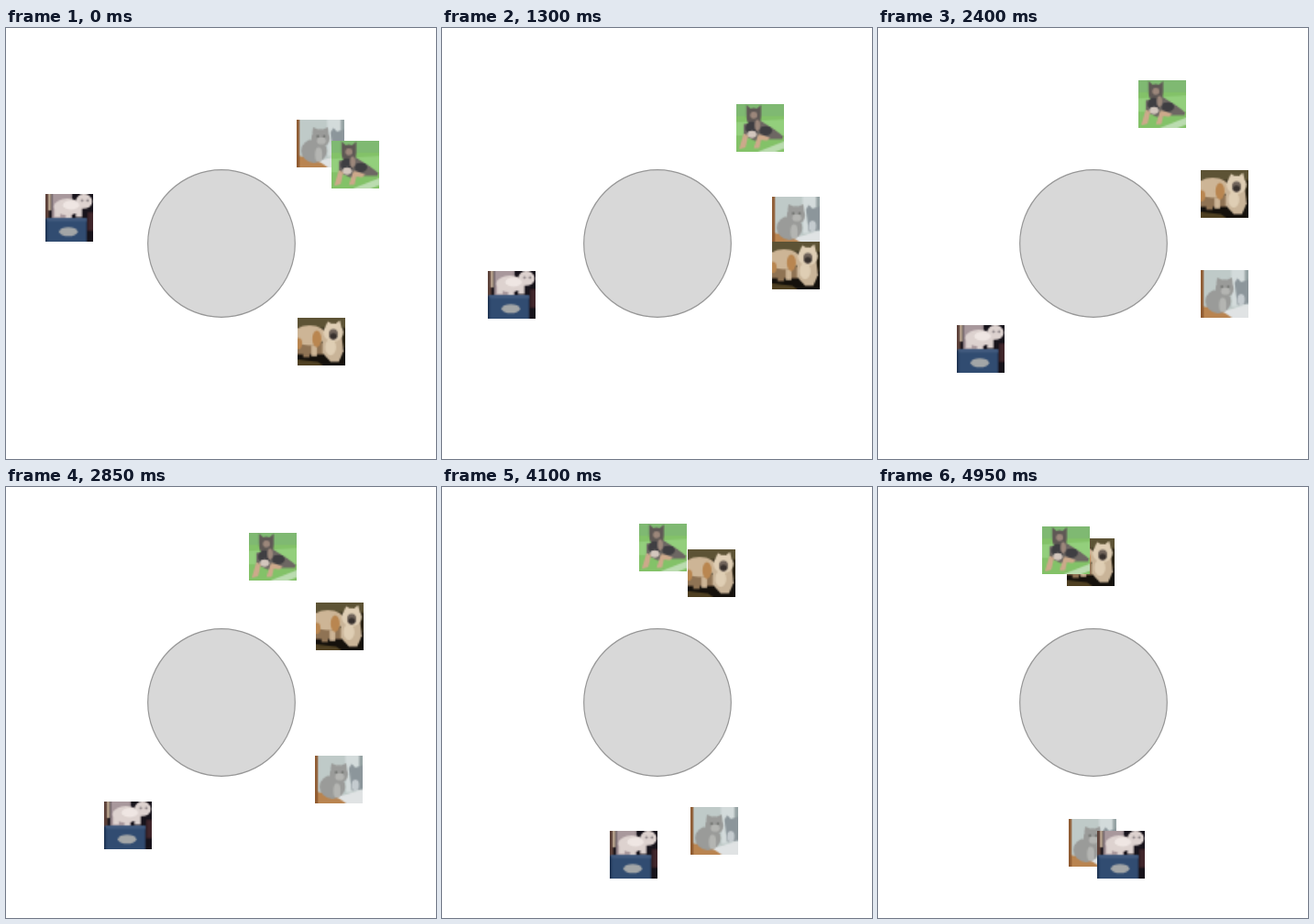
Recreate the animation shown at these times as an HTML page with a canvas. Size 469x470 px, loop 8000 ms.

```html
<!DOCTYPE html>
<html lang="en">
<head>
<meta charset="utf-8">
<style>
  html, body { margin: 0; height: 100%; overflow: hidden; background: #fff; }
  canvas { display: block; }
</style>
</head>
<body>
<canvas id="stage" width="469" height="470"></canvas>
<script>
const ctx = document.getElementById('stage').getContext('2d');
const LOOP = 8000, STEP = 50, SIZE = 52, CENTER = 235;
const times = [0, 750, 1700, 1900, 2850, 3600, 4100, 4950];

// A small soft picture: [colour, path] layers on a 52-unit square, kept at 32 px.
function thumbnail(background, layers) {
  const tile = document.createElement('canvas');
  tile.width = tile.height = 32;
  const c = tile.getContext('2d');
  c.fillStyle = background;
  c.fillRect(0, 0, 32, 32);
  c.scale(32 / SIZE, 32 / SIZE);
  c.filter = 'blur(0.6px)';
  for (const [color, path] of layers) {
    c.fillStyle = color;
    c.fill(new Path2D(path));
  }
  return tile;
}

const oval = (x, y, rx, ry = rx) =>
  `M${x - rx} ${y}a${rx} ${ry} 0 1 1 ${2 * rx} 0a${rx} ${ry} 0 1 1 ${-2 * rx} 0z`;
const box = (x, y, w, h) => `M${x} ${y}h${w}v${h}h${-w}z`;

const greyCat = thumbnail('#bfcac8', [
  ['#d3dbdb', 'M33 -4H48L56 40H34z'],
  ['#97a4a5', box(48, -4, 8, 16)],
  ['#b98450', 'M-4 38L14 42L36 50V56H-4z'],
  ['#e0e3e4', 'M24 45L56 36V56H40z'],
  ['#8f5a30', box(-4, -4, 7, 60)],
  ['#8c969b', 'M37 14L40 9L44 13L56 9V36L40 38z'],
  ['#c4cbcf', oval(44, 32, 4, 6)],
  ['#9a9b99', oval(19, 34, 14, 13) + oval(26, 20, 10) + 'M17 15L18 8L24 11zM28 11L34 8L35 16z'],
  ['#b4b5b2', oval(27, 23, 5, 4) + oval(24, 38, 4, 8)],
  ['#70726f', oval(23, 18, 1.5) + oval(30, 18, 1.5)],
]);

const peke = thumbnail('#2a2314', [
  ['#5d5335', box(-4, -4, 60, 15)],
  ['#15110c', 'M-4 37L56 32V56H-4z'],
  ['#4f4022', 'M-4 45L22 48L34 56H-4z'],
  ['#8f7354', 'M-4 26L30 28L28 40H-4z' + box(6, 34, 7, 9)],
  ['#cdb596', oval(13, 19, 18, 11) + box(15, 30, 6, 12)],
  ['#b98650', oval(21, 23, 5, 9) + oval(1, 28, 4, 6)],
  ['#c9b498', 'M27 20H48L50 36L45 48H36L27 38z'],
  ['#dfceb4', oval(39, 16, 11, 10) + 'M30 10L33 4L38 7zM41 7L46 3L48 11z' + oval(36, 32, 6, 9)],
  ['#6e6259', oval(39, 18, 5, 6)],
  ['#37302d', oval(39, 20, 3.5, 3.5)],
]);

const shepherd = thumbnail('#83c268', [
  ['#7fb972', box(-4, -4, 60, 17)],
  ['#93cf7c', 'M-4 20L56 16V34H-4z'],
  ['#bbdcb0', 'M18 54L56 39V47L32 56z'],
  ['#6d6763', 'M8 22L26 18L42 28L51 35L50 38L37 38L20 40L8 34z'],
  ['#5f5855', oval(19, 14, 8, 10) + 'M11 12L11 1L17 6zM21 6L27 1L27 13z'],
  ['#3f3e42', oval(17, 26, 7, 7) + oval(32, 29, 7, 5)],
  ['#9c877b', oval(19, 12, 4, 4) + oval(23, 23, 3, 6)],
  ['#d3c6bd', oval(17, 33, 5, 4)],
  ['#cda98b', 'M8 32L13 34L10 47L3 49zM24 33L30 34L37 37L33 40L27 39L25 48L19 48z'],
]);

const whiteCat = thumbnail('#17131b', [
  ['#a8989c', box(7, -4, 22, 30)],
  ['#5a3f38', box(-4, -4, 8, 31)],
  ['#c9b49c', box(3, -4, 3, 22)],
  ['#40262b', box(46, 20, 10, 20)],
  ['#314c71', box(1, 27, 44, 30)],
  ['#40597d', box(1, 26, 44, 4)],
  ['#1e3352', box(-4, 28, 6, 28)],
  ['#ddd2cf', oval(24, 14, 15, 9) + oval(42, 8, 9, 8) + box(10, 17, 6, 8) + box(22, 18, 6, 8) + box(33, 13, 7, 12)],
  ['#efe6e3', oval(28, 12, 9, 5)],
  ['#8e8588', oval(40, 7, 1.5) + oval(46, 7, 1.5)],
  ['#a3a6a7', oval(25, 41, 10, 5)],
]);

// Back to front; angles in degrees at each of the key times.
const orbits = [
  { tile: greyCat, radius: 153, angles: [-45.3, -24.7, 1.5, 7.1, 33.3, 52.5, 66, 90.4] },
  { tile: peke, radius: 153, angles: [44.5, 23.9, -1.8, -7.1, -32.8, -53.5, -67.3, -91.1] },
  { tile: shepherd, radius: 169, angles: [-30.5, -40.7, -54, -56.1, -70.6, -81.1, -88, -100.2] },
  { tile: whiteCat, radius: 168.5, angles: [-170.4, -187.5, -208, -212.6, -232.7, -249.8, -261.1, -280.2] },
];

function angleAt(angles, t) {
  let i = 1;
  while (i < times.length - 1 && t > times[i]) i++;
  const part = (t - times[i - 1]) / (times[i] - times[i - 1]);
  return (angles[i - 1] + (angles[i] - angles[i - 1]) * part) * Math.PI / 180;
}

function draw(now) {
  const t = Math.min(Math.floor(now % LOOP / STEP) * STEP, times.at(-1));
  ctx.fillStyle = '#fff';
  ctx.fillRect(0, 0, 469, 470);

  ctx.beginPath();
  ctx.arc(CENTER, CENTER, 80.3, 0, 2 * Math.PI);
  ctx.fillStyle = '#d8d8d8';
  ctx.fill();
  ctx.strokeStyle = '#979797';
  ctx.lineWidth = 1.2;
  ctx.stroke();

  for (const { tile, radius, angles } of orbits) {
    const a = angleAt(angles, t);
    const x = Math.round(CENTER + radius * Math.cos(a) - SIZE / 2);
    const y = Math.round(CENTER + radius * Math.sin(a) - SIZE / 2);
    ctx.drawImage(tile, x, y, SIZE, SIZE);
  }
}

const start = performance.now();
function tick() {
  draw(performance.now() - start);
  requestAnimationFrame(tick);
}
tick();
</script>
</body>
</html>
```
